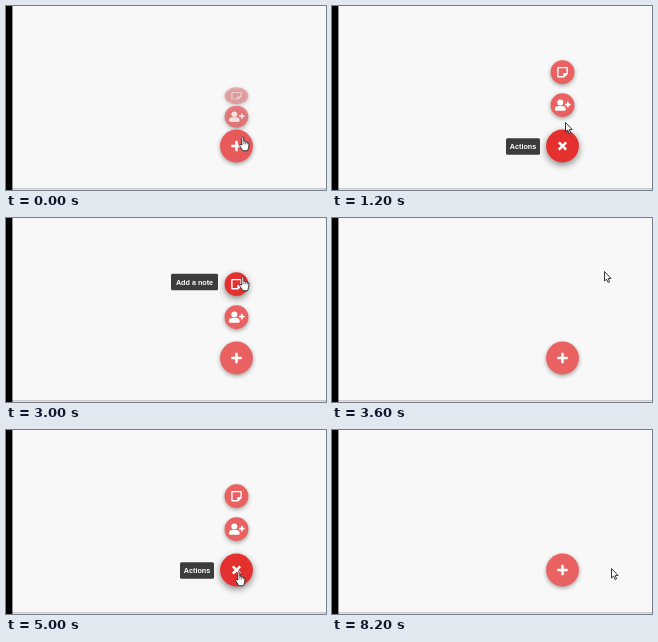
These frames come from a looping animation (320x184 px, 8.6 s). An HTML page with a canvas:

```html
<!DOCTYPE html>
<html lang="en">
<head>
<meta charset="utf-8">
<title>Floating action menu</title>
<style>
  html, body { margin: 0; width: 100%; height: 100%; overflow: hidden; background: #f8f8f8; }
  canvas { display: block; width: 320px; height: 184px; }
</style>
</head>
<body>
<canvas id="stage" width="320" height="184"></canvas>
<script>
const ctx = document.getElementById('stage').getContext('2d');
const LOOP = 8600;
const CENTER = 230.5;
const MAIN_Y = 140, MATE_Y = 99.2, NOTE_Y = 66.2;

const TIPS = {
  actions: { text: 'Actions', left: 174, right: 208, y: 140.5 },
  mate: { text: 'Add mate', left: 171, right: 212, y: 97 },
  note: { text: 'Add a note', left: 165, right: 212, y: 64 }
};

// Each step keeps its values until the next one; hover values run from 0 to 1.
const CLOSED = { open: 0, main: 0, mate: 0, note: 0, tip: null };
const steps = [
  { at: 0, ...CLOSED, open: 0.5, main: 0.15, cursor: ['hand', 233, 130] },
  { at: 200, ...CLOSED, open: 1, main: 1, tip: 'actions', cursor: ['hand', 233, 130] },
  { at: 1200, ...CLOSED, open: 1, main: 1, tip: 'actions', cursor: ['arrow', 233, 116] },
  { at: 1400, ...CLOSED, open: 1, main: 0.4, mate: 0.7, tip: 'mate', cursor: ['hand', 233, 90] },
  { at: 1600, ...CLOSED, open: 1, mate: 1, tip: 'mate', cursor: ['hand', 233, 87] },
  { at: 2400, ...CLOSED, open: 1, note: 1, tip: 'note', cursor: ['hand', 233, 58] },
  { at: 3400, ...CLOSED, open: 1, note: 0.4, tip: 'note', cursor: ['arrow', 246, 57] },
  { at: 3600, ...CLOSED, cursor: ['arrow', 272, 53] },
  { at: 4600, ...CLOSED, cursor: ['arrow', 255, 86] },
  { at: 4800, ...CLOSED, open: 0.2, cursor: ['hand', 230, 117] },
  { at: 5000, ...CLOSED, open: 1, main: 1, tip: 'actions', cursor: ['hand', 229, 141] },
  { at: 5800, ...CLOSED, open: 1, main: 0.5, tip: 'actions', cursor: ['arrow', 252, 142] },
  { at: 6000, ...CLOSED, cursor: ['arrow', 279, 138] }
];

function mix(from, to, k) {
  return `rgb(${from.map((v, i) => Math.round(v + (to[i] - v) * k)).join(',')})`;
}

function at(x, y, draw) {
  ctx.save();
  ctx.translate(x, y);
  draw();
  ctx.restore();
}

function polygon(points) {
  ctx.beginPath();
  points.forEach(([x, y]) => ctx.lineTo(x, y));
  ctx.closePath();
}

function disc(radius, hover) {
  ctx.save();
  ctx.shadowColor = `rgba(0,0,0,${0.36 + hover * 0.12})`;
  ctx.shadowBlur = 4 + hover * 3;
  ctx.shadowOffsetY = 1.6 + hover;
  ctx.fillStyle = mix([233, 97, 97], [229, 48, 48], hover);
  ctx.beginPath();
  ctx.arc(0, 0, radius, 0, Math.PI * 2);
  ctx.fill();
  ctx.restore();
}

function plus(x, y, size, weight) {
  ctx.fillRect(x - size / 2, y - weight / 2, size, weight);
  ctx.fillRect(x - weight / 2, y - size / 2, weight, size);
}

function mainButton(hover) {
  at(CENTER, MAIN_Y, () => {
    disc(16.4, hover);
    ctx.rotate(hover > 0.3 ? hover * Math.PI / 4 : 0);
    ctx.fillStyle = '#fff';
    plus(0, 0, 10.4, 2.5);
  });
}

function mateIcon() {
  ctx.fillStyle = '#fff';
  ctx.beginPath();
  ctx.arc(-2.2, -2.7, 3, 0, Math.PI * 2);
  ctx.fill();
  ctx.beginPath();
  ctx.roundRect(-7.6, 0.7, 10.8, 4.9, [3.4, 3.4, 1.4, 1.4]);
  ctx.fill();
  plus(5.3, -0.6, 5.6, 1.7);
}

function noteIcon() {
  ctx.strokeStyle = '#fff';
  ctx.lineWidth = 1.4;
  ctx.lineJoin = 'round';
  polygon([[-4.6, -4.6], [4.6, -4.6], [4.6, 1.5], [1.5, 4.6], [-4.6, 4.6]]);
  ctx.stroke();
  ctx.fillStyle = '#fff';
  polygon([[0.8, 5], [0.8, 0.8], [5, 0.8]]);
  ctx.fill();
}

function smallButton(y, drop, squash, alpha, hover, icon) {
  at(CENTER, y + drop, () => {
    ctx.globalAlpha = alpha;
    ctx.scale(1, squash);
    disc(11.9, hover);
    icon();
  });
}

function menu(s) {
  const shut = 1 - s.open;
  if (!s.open) return;
  smallButton(NOTE_Y, 47 * shut, 1 - 0.58 * shut, s.open ** 1.1, s.note, noteIcon);
  smallButton(MATE_Y, 23 * shut, 1 - 0.14 * shut, s.open ** 0.4, s.mate, mateIcon);
}

function tooltip({ text, left, right, y }) {
  ctx.fillStyle = '#3c3c3c';
  ctx.beginPath();
  ctx.roundRect(left, y - 8.3, right - left, 16.6, 1.5);
  ctx.fill();
  ctx.fillStyle = '#fff';
  ctx.font = 'bold 7.2px "Liberation Sans", Arial, sans-serif';
  ctx.textAlign = 'center';
  ctx.textBaseline = 'alphabetic';
  ctx.fillText(text, (left + right) / 2, y + 2.5);
}

function outline(width) {
  ctx.fillStyle = '#fff';
  ctx.strokeStyle = '#222';
  ctx.lineWidth = width;
  ctx.lineJoin = 'round';
  ctx.fill();
  ctx.stroke();
}

const cursors = {
  arrow() {
    polygon([[0.5, 0.5], [0.5, 10], [2.6, 8.1], [4.1, 11.5], [5.6, 10.8], [4.2, 7.6], [7, 7.4]]);
    outline(0.9);
  },
  hand() {
    ctx.beginPath();
    ctx.moveTo(2.8, 9);
    ctx.lineTo(2.8, 1.6);
    ctx.quadraticCurveTo(3.8, -0.2, 4.8, 1.6);
    ctx.lineTo(4.8, 5.4);
    ctx.quadraticCurveTo(6, 4.6, 6.7, 5.9);
    ctx.quadraticCurveTo(8, 5.2, 8.5, 6.5);
    ctx.quadraticCurveTo(10, 6.2, 10, 8);
    ctx.lineTo(9.6, 11.6);
    ctx.lineTo(8.6, 14.8);
    ctx.lineTo(3.8, 14.8);
    ctx.lineTo(0.6, 9.6);
    ctx.quadraticCurveTo(0.2, 7.4, 2.8, 9);
    outline(0.9);
    ctx.lineWidth = 0.6;
    ctx.beginPath();
    for (const x of [4.9, 6.7, 8.4]) {
      ctx.moveTo(x, 6);
      ctx.lineTo(x, 8.4);
    }
    ctx.stroke();
  }
};

function draw(time) {
  const s = steps.findLast(step => step.at <= time);
  ctx.fillStyle = '#f8f8f8';
  ctx.fillRect(0, 0, 320, 184);
  ctx.fillStyle = '#c9c9c9';
  ctx.fillRect(6, 182, 314, 1.5);
  ctx.fillStyle = '#000';
  ctx.fillRect(0, 0, 6.4, 184);

  menu(s);
  mainButton(s.main);
  if (s.tip) tooltip(TIPS[s.tip]);
  const [kind, x, y] = s.cursor;
  at(x, y, cursors[kind]);
}

const start = performance.now();
function tick() {
  draw((performance.now() - start) % LOOP);
  requestAnimationFrame(tick);
}
tick();
</script>
</body>
</html>
```
